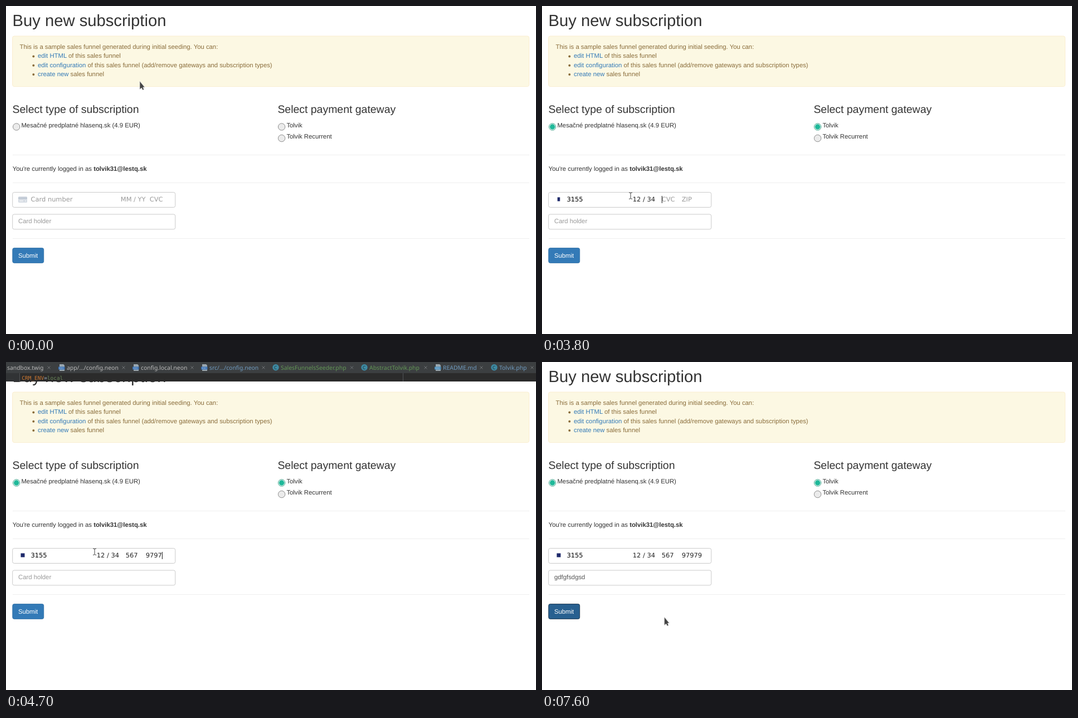
Write an HTML page that moves like this. It is 951 px wide and 589 px high and loops after 8000 ms.

```html
<!DOCTYPE html>
<html lang="en">
<head>
<meta charset="utf-8">
<title>Buy new subscription</title>
<style>
  html, body { margin: 0; width: 100%; height: 100%; overflow: hidden; background: #fff; }
  svg { display: block; width: 951px; height: 589px; }
  text { font: 11.34px "Liberation Sans", Arial, sans-serif; fill: #333; white-space: pre; text-rendering: geometricPrecision; }
  .h1 { font-size: 29.19px; }
  .h3 { font-size: 19.44px; }
  .warn text { fill: #8a6d3b; }
  .link { fill: #337ab7; }
  .field { fill: #fff; stroke: #c4c4c4; stroke-width: .9; }
  .card text { font: 11.41px "DejaVu Sans", sans-serif; }
  text.hint { fill: #999; }
  .tabs text { font: 10.4px "Noto Sans", sans-serif; }
  .tabs text.mono { font: 9.46px "DejaVu Sans Mono", monospace; }
</style>
</head>
<body>
<svg viewBox="0 0 951 589">
  <defs>
    <clipPath id="numClip"><rect x="44.5" y="336" width="160" height="24"/></clipPath>
    <filter id="blur" x="-10%" y="-50%" width="120%" height="200%"><feGaussianBlur stdDeviation="2.4"/></filter>
  </defs>
  <rect width="951" height="589" fill="#fff"/>
  <text class="h1" x="11.6" y="36.4">Buy new subscription</text>

  <g class="warn">
    <rect x="11.6" y="54" width="927" height="90.6" rx="3.3" fill="#fcf8e3" stroke="#faebcc" stroke-width=".9"/>
    <text x="24.5" y="77">This is a sample sales funnel generated during initial seeding. You can:</text>
    <g fill="#8a6d3b"><circle cx="49.3" cy="90.6" r="2"/><circle cx="49.3" cy="106.8" r="2"/><circle cx="49.3" cy="123.1" r="2"/></g>
    <text x="57" y="93.4"><tspan class="link">edit HTML</tspan> of this sales funnel</text>
    <text x="57" y="109.7"><tspan class="link">edit configuration</tspan> of this sales funnel (add/remove gateways and subscription types)</text>
    <text x="57" y="126"><tspan class="link">create new</tspan> sales funnel</text>
  </g>

  <text class="h3" x="11.6" y="192">Select type of subscription</text>
  <text class="h3" x="487.4" y="192">Select payment gateway</text>
  <text x="27.4" y="218">Mesačné predplatné hlasenq.sk (4.9 EUR)</text>
  <text x="503.4" y="218">Tolvik</text>
  <text x="503.4" y="238.4">Tolvik Recurrent</text>
  <g id="radios"></g>

  <path d="M12 267.5H939M12 317.5H939M12 417.5H939" stroke="#eee"/>
  <text x="11.8" y="296.2">You're currently logged in as <tspan font-weight="bold">tolvik31@lestq.sk</tspan></text>

  <g class="card">
    <rect class="field" x="11.7" y="334.6" width="292" height="26.9" rx="3"/>
    <g id="icon"></g>
    <g clip-path="url(#numClip)"><text id="num" y="350.6"></text></g>
    <text id="exp" y="350.6"></text>
    <text id="cvc" y="350.6"></text>
    <text id="zip" x="250.8" y="350.6"></text>
  </g>

  <rect id="glow" x="11.7" y="374" width="292" height="26.9" rx="3" fill="#66afe9" filter="url(#blur)"/>
  <rect id="box" class="field" x="11.7" y="374" width="292" height="26.9" rx="3"/>
  <text id="holder" x="22" y="390.4"></text>
  <rect id="caret" width="1" height="13" fill="#111"/>

  <rect id="button" x="11.8" y="434.6" width="55.9" height="26.8" rx="3" stroke-width=".85"/>
  <text x="21.9" y="451.6" style="fill:#fff">Submit</text>

  <g id="tabs" class="tabs"></g>
  <g id="pointer"></g>
</svg>
<script>
const LOOP = 8000, STEP = 100;
const $ = id => document.getElementById(id);
const clamp = v => Math.max(0, Math.min(1, v));
const ramp = (t, a, b) => clamp((t - a) / (b - a));
const ease = p => p * p * (3 - 2 * p);
const mix = (a, b, p) => a + (b - a) * p;
const typed = (text, t, start, perStep) =>
  text.slice(0, Math.max(0, Math.floor((t - start) / STEP + 1) * perStep));

// Pointer stops: time, x, y
const stops = [
  [0, 240, 135], [500, 19.5, 213], [700, 19.5, 213], [1400, 497.5, 215.5],
  [1700, 497.5, 215.5], [2400, 159, 340.5], [5500, 159, 340.5], [5800, 98.8, 430],
  [6100, 46, 452], [6200, 46, 452], [6600, 219.5, 458]
];

const shapes = {
  arrow: '<path d="M0 0V14.8L3.2 12L5.2 16L7.6 14.8L5.7 11H9Z" fill="#444" stroke="#ddd" stroke-width=".7"/>',
  beam: '<path d="M-3 -5.5Q-.5 -5.5 0 -4.5Q.5 -5.5 3 -5.5M0 -4.5V5M-3 6Q-.5 6 0 5Q.5 6 3 6" fill="none" stroke="#444"/>',
  hand: '<path d="M-1 0Q1 -1.5 2 .5V5L8 6.5Q9 7 8.7 9L7.5 15H.5L-4 9.5Q-4.3 7.5 -1 9Z" fill="#444" stroke="#ddd" stroke-width=".7"/>'
};

const icons = {
  blank: '<rect x="-8" y="-5" width="16" height="11" rx="1.5" fill="#d5dbe3"/><path d="M-8 -2H8" stroke="#b9c3d0" stroke-width="2"/><path d="M-6 3H1M4 3H6" stroke="#f4f6f8" stroke-width="1.3"/>',
  brand: '<rect x="-3.5" y="-3.5" width="7" height="7" fill="#1f2a6b"/>',
  back: '<rect x="-8" y="-5" width="16" height="11" rx="1.5" fill="#d5dbe3"/><path d="M-8 -2H8" stroke="#6b7c93" stroke-width="2"/><rect x="1" y="1" width="6" height="3.5" fill="#fff" stroke="#6772e5" stroke-width=".7"/>'
};

const tabList = [
  ['sandbox.twig', 2, '#bbb', 77], ['app/.../config.neon', 109, '#bbb', 211, 'doc'],
  ['config.local.neon', 242, '#bbb', 334, 'doc'], ['src/.../config.neon', 365, '#6f9bc0', 462, 'doc'],
  ['SalesFunnelsSeeder.php', 493, '#629755', 620.5, 'cls'], ['AbstractTolvik.php', 652, '#629755', 753, 'cls'],
  ['README.md', 784, '#6f9bc0', 853, 'md'], ['Tolvik.php', 885, '#6f9bc0', 944, 'cls']
];

function tabIcon(kind, x) {
  if (kind === 'cls') return `<circle cx="${x - 9}" cy="9.8" r="5.7" fill="#3d8aa3"/>
    <text x="${x - 12}" y="13" style="font-size:8.5px;fill:#24363d">C</text>`;
  const label = kind === 'md' ? '#4f91bd' : '#3f74b5';
  return `<path d="M${x - 13} 4H${x - 6}L${x - 4} 6V16H${x - 13}Z" fill="#9aa7b0"/>
    <rect x="${x - 15}" y="8.5" width="11.5" height="5" fill="${label}"/>
    <path d="M${x - 13} 11H${x - 6}" stroke="#c8dced" stroke-width="1.2" stroke-dasharray="2 1"/>`;
}

$('tabs').innerHTML = `<rect width="951" height="35" fill="#2b2b2b"/>
  <rect width="951" height="20" fill="#3c3f41"/>
  <rect y="20" width="24" height="15" fill="#313335"/>
  <path d="M24.5 20V35M712.5 20V35" stroke="#505355"/>
  <text class="mono" x="28.3" y="32.3" style="fill:#cc7832">CRM_ENV<tspan fill="#a9b7c6">=</tspan><tspan fill="#6a8759">local</tspan></text>` +
  tabList.map(([name, x, color, cross, kind]) => `${kind ? tabIcon(kind, x) : ''}
    <text x="${x}" y="13.6" style="fill:${color}">${name}</text>
    <path d="M${cross - 2.5} 7.5l5 5m0 -5l-5 5" stroke="#75797b" stroke-width=".9"/>`).join('');

function radio(x, y, checked, focused) {
  const dot = checked
    ? `<circle cx="${x}" cy="${y}" r="6.2" fill="#e8f6f2" stroke="#45a890"/><circle cx="${x}" cy="${y}" r="4.7" fill="#1fb899"/>`
    : `<circle cx="${x}" cy="${y}" r="6.2" fill="#ebebeb" stroke="#8f8f8f"/>`;
  const ring = focused
    ? `<rect x="${x - 6.5}" y="${y - 6.5}" width="13" height="13" fill="none" stroke="#3ba68e" stroke-dasharray="1.5 1"/>` : '';
  return dot + ring;
}

function pointerAt(t) {
  const i = stops.findIndex(s => s[0] > t);
  if (i < 0) return stops[stops.length - 1].slice(1);
  const a = stops[i - 1], b = stops[i], p = ease(ramp(t, a[0], b[0]));
  return [mix(a[1], b[1], p), mix(a[2], b[2], p)];
}

function setText(id, value, hint, color) {
  const el = $(id);
  el.textContent = value || hint;
  el.setAttribute('class', value ? '' : 'hint');
  el.style.fill = value ? color : '';
}

function setCaret(t) {
  let id = 'num', value = true, y = 341;
  if (t >= 5000) { id = 'holder'; value = t >= 5200; y = 380.5; }
  else if (t >= 4200) { id = 'zip'; value = t >= 4300; }
  else if (t >= 3800) { id = 'cvc'; value = t >= 3900; }
  else if (t >= 3600) id = 'exp';
  else value = t >= 2800;
  const el = $(id);
  const end = +el.getAttribute('x') + (value ? el.getComputedTextLength() : 0);
  $('caret').setAttribute('x', end);
  $('caret').setAttribute('y', y);
  $('caret').style.display = t >= 2700 && t < 6200 ? '' : 'none';
}

function setCard(t) {
  const slide = ease(ramp(t, 3500, 3700));
  const num = $('num');
  setText('num', typed('4000 0027 6000 3155', t, 2800, 3), 'Card number', '#000');
  if (t >= 3700) num.textContent = '3155';
  num.setAttribute('x', t < 3700 ? 44.6 - 98 * slide : 44.6);
  $('exp').setAttribute('x', mix(205.8, 162.8, slide));
  $('cvc').setAttribute('x', mix(257.8, 214.8, slide));
  setText('exp', t < 3600 ? '' : t < 3700 ? '12 / ' : t < 3800 ? '12 / 3' : '12 / 34', 'MM / YY', '#222');
  setText('cvc', typed('567', t, 3900, 1), 'CVC', '#222');
  const zip = t < 4600 ? typed('97', t, 4300, 1) : typed('97979', t, 4400, 1);
  setText('zip', zip, t >= 3600 ? 'ZIP' : '', '#222');

  const flipped = t >= 3900 && t < 4200;
  const scale = t === 3800 || t === 4200 ? .65 : 1;
  $('icon').innerHTML = t < 2800 ? icons.blank : flipped ? icons.back : icons.brand;
  $('icon').setAttribute('transform', `translate(30 347) scale(${scale} 1)`);
}

function render(t) {
  const [x, y] = pointerAt(t);
  const onField = x > 11 && x < 304 && (y > 334 && y < 362 || y > 374 && y < 401);
  const onButton = x > 11 && x < 68 && y > 434 && y < 462;

  $('radios').innerHTML =
    radio(18.7, 217, t >= 800, t >= 700 && t < 1700) +
    radio(494.6, 217, t >= 1800, t >= 1700 && t < 2700) +
    radio(494.6, 237.5, false, false);

  setCard(t);
  setText('holder', t < 5200 ? '' : typed('gdfgfsdgsd', t, 5300, 3), 'Card holder', '#555');
  const focus = t < 6200 ? ramp(t, 4900, 5100) : 0;
  $('glow').style.opacity = focus * .6;
  $('box').style.stroke = focus > 0 ? '#66afe9' : '';
  setCaret(t);

  const pressed = t >= 6200;
  $('button').setAttribute('fill', pressed || onButton ? '#286090' : '#337ab7');
  $('button').setAttribute('stroke', pressed ? '#122b40' : onButton ? '#204d74' : '#2e6da4');

  $('tabs').style.display = t >= 4200 && t < 4800 ? '' : 'none';
  $('pointer').innerHTML = shapes[onField ? 'beam' : onButton ? 'hand' : 'arrow'];
  $('pointer').setAttribute('transform', `translate(${x} ${y})`);
}

const start = performance.now();
let last = -1;
function tick() {
  const t = Math.floor((performance.now() - start) % LOOP / STEP) * STEP;
  if (t !== last) render(last = t);
  requestAnimationFrame(tick);
}
tick();
</script>
</body>
</html>
```
